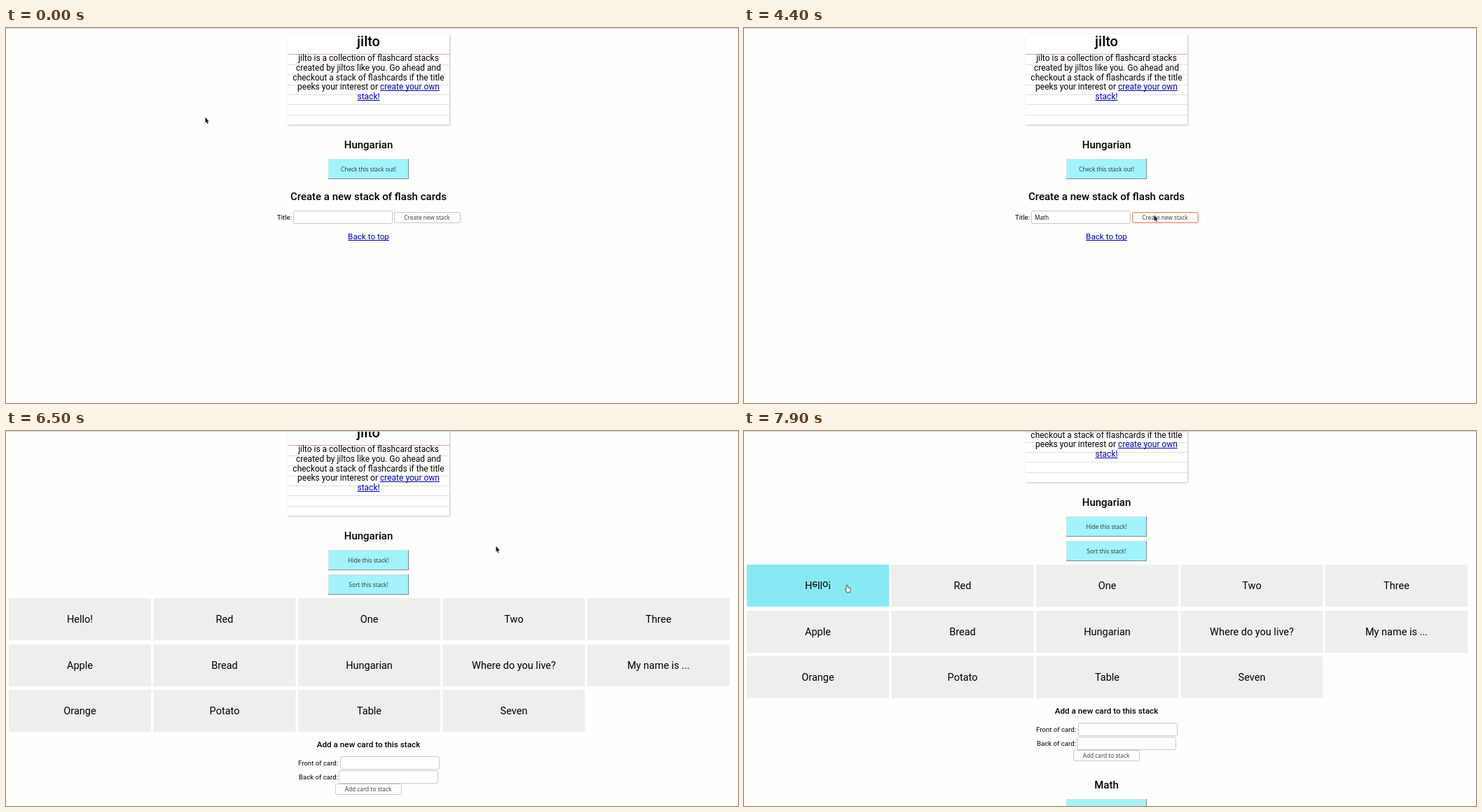
Write an HTML page with a canvas that moves like this. It is 1045 px wide and 536 px high and loops after 8000 ms.

```html
<!DOCTYPE html>
<html lang="en">
<head>
<meta charset="utf-8">
<title>Flash card stacks</title>
<style>
  html, body { margin: 0; width: 100%; height: 100%; overflow: hidden; background: #fefefd; }
  canvas { display: block; }
</style>
</head>
<body>
<canvas id="stage" width="1045" height="536"></canvas>
<script>
const ctx = document.getElementById('stage').getContext('2d');
const LOOP = 8000, STEP = 100, MID = 517.5;
const INK = '#000', LINK = '#0000bc', ORANGE = '#dc937c', LINE = '#c8c8c8';
const AQUA = '#a2f3fb', HOVER = '#88e9f4';
const page = (size, weight = 400) => `${weight} ${size}px Roboto, sans-serif`;
const UI = '8.3px "Open Sans", sans-serif';
const HEADING = page(15, 500), BODY = page(12), LABEL = page(9.65), CARD = page(14.5);

const WORDS = ['Hello!', 'Red', 'One', 'Two', 'Three', 'Apple', 'Bread', 'Hungarian',
  'Where do you live?', 'My name is ...', 'Orange', 'Potato', 'Table', 'Seven'];

const FOCUS = 1300, TYPE = 2000, SUBMIT = 4300, ADDED = 4700, PRESS = 5800, OPEN = 6300;
const HAND = 6700, FLIP = 7150;

// Stops of the pointer: arrival time, x, y.
const STOPS = [
  [0, 284, 127], [300, 275, 125], [800, 374, 264], [1100, 430, 268], [TYPE, 435, 270],
  [3100, 454, 265], [4000, 603, 269], [4100, 585, 267], [5100, 666, 214], [5400, 540, 178],
  [5600, 501, 196], [OPEN - STEP, 501, 196], [OPEN, 699, 164], [HAND, 641, 173],
  [6800, 345, 220], [6900, 345, 220], [7100, 144, 220]
];

const within = (t, from, to) => t >= from && t < to;

function ease(p) {
  p = Math.min(1, Math.max(0, p));
  return p * p * (3 - 2 * p);
}

// Short trips take less time than long ones, and each ends at its stop.
function pointerAt(t) {
  const next = STOPS.findIndex(stop => stop[0] > t);
  if (next < 0) return STOPS[STOPS.length - 1].slice(1);
  const [t0, x0, y0] = STOPS[next - 1], [t1, x1, y1] = STOPS[next];
  const trip = Math.min(t1 - t0, 400, 2.5 * Math.hypot(x1 - x0, y1 - y0)) || 1;
  const p = ease(1 - (t1 - t) / trip);
  return [x0 + (x1 - x0) * p, y0 + (y1 - y0) * p];
}

const scrollAt = t => Math.round(65 * ease((t - 6400) / 300));

function box(x, y, w, h, color) {
  ctx.fillStyle = color;
  ctx.fillRect(x, y, w, h);
}

function text(str, x, y, font, color = INK, align = 'center') {
  ctx.font = font;
  ctx.fillStyle = color;
  ctx.textAlign = align;
  ctx.fillText(str, x, y);
}

function link(str, x, y, font) {
  text(str, x, y, font, LINK, 'left');
  box(x, Math.round(y + 1), ctx.measureText(str).width, 1, LINK);
}

function centeredLink(str, y, font) {
  ctx.font = font;
  link(str, MID - ctx.measureText(str).width / 2, y, font);
}

function outline(x, y, w, h, focused, fill) {
  ctx.beginPath();
  ctx.roundRect(x + .5, y + .5, w - 1, h - 1, 2);
  ctx.fillStyle = fill;
  ctx.fill();
  ctx.lineWidth = 1;
  ctx.strokeStyle = focused ? ORANGE : LINE;
  ctx.stroke();
  if (focused) {
    ctx.strokeStyle = 'rgba(220,147,124,.35)';
    ctx.strokeRect(x + 1.5, y + 1.5, w - 3, h - 3);
  }
}

function field(x, y, focused, value = '') {
  outline(x, y, 142, 19, focused, '#fff');
  text(value, x + 5, y + 13, UI, INK, 'left');
  if (focused) box(Math.round(x + 5 + ctx.measureText(value).width), y + 4, 1, 11, INK);
}

function formButton(str, x, y, focused) {
  outline(x, y, 95, 16, focused, '#fdfdfc');
  text(str, x + 47, y + 11, UI, '#3c3c3c');
}

function stackButton(str, y, pressed) {
  const light = '#cfe4e6', dark = '#7a8e91', shift = pressed ? 1 : 0;
  box(460, y, 115, 29, pressed ? light : dark);
  box(460, y, 114, 28, pressed ? dark : light);
  box(461, y + 1, 113, 27, AQUA);
  text(str, MID + shift, y + 18, UI, '#333');
}

function stackHeading(name, y) {
  text(name, MID, y, HEADING);
}

function intro() {
  ctx.save();
  ctx.shadowColor = 'rgba(0,0,0,.25)';
  ctx.shadowBlur = 2.5;
  ctx.shadowOffsetX = ctx.shadowOffsetY = .6;
  box(402, 9, 231, 129, '#fff');
  ctx.restore();
  box(402, 37, 231, 1, '#d6a4a4');
  for (let i = 1; i < 7; i++) box(402, Math.round(37.3 + i * 14.4), 231, 1, '#e0e0e0');

  text('jilto', MID, 26, page(20, 500));
  ['jilto is a collection of flashcard stacks',
   'created by jiltos like you. Go ahead and',
   'checkout a stack of flashcards if the title'
  ].forEach((line, i) => text(line, MID, 47 + i * 13.8, BODY));

  const lead = 'peeks your interest or ', tail = 'create your own';
  ctx.font = BODY;
  const leadWidth = ctx.measureText(lead).width;
  const left = MID - (leadWidth + ctx.measureText(tail).width) / 2;
  text(lead, left, 88, BODY, INK, 'left');
  link(tail, left + leadWidth, 88, BODY);
  centeredLink('stack!', 102, BODY);
}

function newStackForm(top, t) {
  const letters = t < ADDED ? Math.max(0, Math.floor((t - TYPE) / 200) + 1) : 0;
  text('Create a new stack of flash cards', MID, top + 246, HEADING);
  text('Title:', 387, top + 274, LABEL, INK, 'left');
  field(410, top + 261, within(t, FOCUS, SUBMIT), 'Math'.slice(0, letters));
  formButton('Create new stack', 554, top + 263, within(t, SUBMIT, PRESS));
  centeredLink('Back to top', top + 302, page(11.7));
  if (within(t, TYPE, SUBMIT)) {
    box(410, 280, 142, 14, LINE);
    box(411, 281, 140, 12, '#fff');
    text('ECMAScript', 414, 290.5, UI, INK, 'left');
  }
}

function flashcard(word, index, pointer, angle) {
  const halfW = 101.5, halfH = 30, depth = 600;
  const cx = 105.5 + (index % 5) * 206.5;
  const cy = Math.round(256 + Math.floor(index / 5) * 65.7) + halfH;
  const cos = Math.cos(angle), sin = Math.sin(angle);
  const hovered = Math.abs(pointer[0] - cx) < halfW && Math.abs(pointer[1] - cy) < halfH;
  ctx.beginPath();
  for (const [x, y] of [[-1, -1], [1, -1], [1, 1], [-1, 1]]) {
    const scale = depth / (depth - y * halfH * sin);
    ctx.lineTo(cx + x * halfW * scale, cy + y * halfH * cos * scale);
  }
  ctx.fillStyle = hovered ? HOVER : '#eeeeed';
  ctx.fill();
  ctx.save();
  ctx.translate(cx, cy - .5);
  ctx.scale(1, cos);
  text(word, 0, 5.1, CARD);
  ctx.restore();
}

function openStack(t) {
  // The painted pointer trails the hover by half a step.
  const [x, y] = pointerAt(t + STEP / 2);
  const pointer = [x, y + scrollAt(t)];
  const angle = Math.PI * ease((t - FLIP) / 600);
  stackButton('Hide this stack!', 187);
  stackButton('Sort this stack!', 222);
  for (let i = WORDS.length - 1; i >= 0; i--) {
    flashcard(WORDS[i], i, pointer, i ? 0 : angle);
  }
  text('Add a new card to this stack', MID, 469, page(11.7, 500));
  text('Front of card:', 417, 495, LABEL, INK, 'left');
  field(477, 482, false);
  text('Back of card:', 418, 514.5, LABEL, INK, 'left');
  field(475, 502, false);
  formButton('Add card to stack', 470, 521, false);
  stackHeading('Math', 576);
  stackButton('Check this stack out!', 591);
}

function cursor(t) {
  const arrow = 'M.5 .5V8.8L2.2 7.2 3.6 10.2 4.8 9.6 3.5 6.7 5.8 6.5Z';
  const hand = 'M2.3 .8H3.6L3.8 4 7.4 4.8 8 5.8 7 10.5H3.2L.7 6.8 1.2 6 2.3 6.8Z';
  const pointing = t >= HAND;
  const path = new Path2D(pointing ? hand : arrow);
  ctx.save();
  ctx.translate(...pointerAt(t).map(Math.round));
  ctx.lineJoin = 'round';
  ctx.lineWidth = 1.4;
  ctx.strokeStyle = pointing ? '#222' : 'rgba(255,255,255,.8)';
  ctx.stroke(path);
  ctx.fillStyle = pointing ? '#fff' : '#1c1c1c';
  ctx.fill(path);
  ctx.restore();
}

function draw(now) {
  const t = Math.floor((now % LOOP) / STEP) * STEP;
  box(0, 0, 1045, 536, '#fefefd');
  ctx.save();
  ctx.translate(0, -scrollAt(t));
  intro();
  stackHeading('Hungarian', 172);
  if (t >= OPEN) {
    openStack(t);
  } else {
    const added = t >= ADDED;
    stackButton('Check this stack out!', 187, t >= PRESS);
    if (added) {
      stackHeading('Math', 252);
      stackButton('Check this stack out!', 267);
    }
    newStackForm(added ? 79 : 0, t);
  }
  ctx.restore();
  box(0, 0, 1045, 1, '#d6d6d5');
  cursor(t);
}

const start = performance.now();
function tick() {
  draw(performance.now() - start);
  requestAnimationFrame(tick);
}
tick();
</script>
</body>
</html>
```
